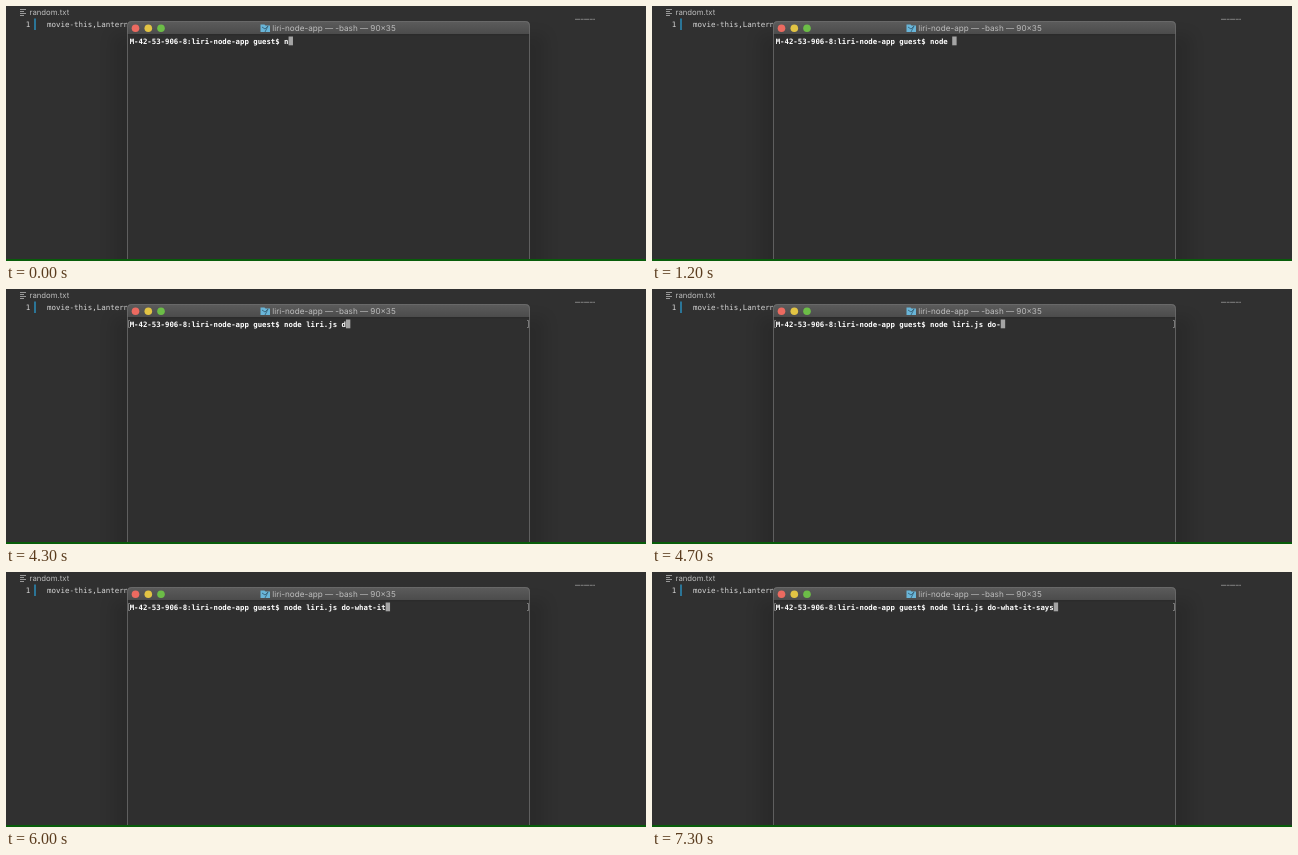
Recreate the animation shown at these times as an HTML page. Size 640 px wide and 255 px high, loop 8 s.

```html
<!DOCTYPE html>
<html lang="en">
<head>
<meta charset="utf-8">
<title>Terminal typing</title>
<style>
  html, body { margin: 0; width: 100%; height: 100%; overflow: hidden; background: #303030; }
  svg { display: block; }
  text { white-space: pre; text-rendering: geometricPrecision; }
  .ui { font-family: Inter, sans-serif; fill: #bcbcbc; }
  .code { font: 7.5px "DejaVu Sans Mono", monospace; fill: #d6d6d6; }
  .shell { font: bold 7.33px "DejaVu Sans Mono", monospace; fill: #fff; }
</style>
</head>
<body>
<svg width="640" height="255" viewBox="0 0 640 255">
  <defs>
    <filter id="soft" x="-20%" y="-20%" width="140%" height="140%"><feGaussianBlur stdDeviation="7"/></filter>
    <linearGradient id="bar" x2="0" y2="1">
      <stop stop-color="#5c5c5c"/><stop offset="1" stop-color="#4b4b4b"/>
    </linearGradient>
  </defs>

  <!-- editor -->
  <rect width="640" height="255" fill="#303030"/>
  <path d="M14 3.5h6M14 5.5h4M14 7.5h6M14 9.5h4" stroke="#a5a5a5" stroke-width=".9"/>
  <text class="ui" x="23.5" y="9" font-size="7.75">random.txt</text>
  <text class="code" x="19.8" y="20.5">1</text>
  <rect x="28" y="12.5" width="2" height="11.5" fill="#2b7597"/>
  <text class="code" x="41" y="20.5">movie-this,Lantern of the Fern</text>
  <path d="M569 13.3H589" stroke="#808080" stroke-dasharray="5 .6 3 .5"/>

  <!-- terminal window -->
  <rect x="106" y="28" width="434" height="240" fill="#000" opacity=".11" filter="url(#soft)"/>
  <path d="M121 256V19.5q0-4.5 4.5-4.5h394q4.5 0 4.5 4.5V256z" fill="#2f2f2f"/>
  <path d="M121 28.5V19.5q0-4.5 4.5-4.5h394q4.5 0 4.5 4.5v9z" fill="url(#bar)"/>
  <path d="M121 28.7H524" stroke="#202020" stroke-width=".7"/>
  <path d="M121.5 256V19.5q0-4 4-4h394q4 0 4 4V256" fill="none" stroke="#6c6c6c" stroke-width=".8"/>
  <circle cx="129.5" cy="22.2" r="3.8" fill="#ec6a60"/>
  <circle cx="142.3" cy="22.2" r="3.8" fill="#e2c444"/>
  <circle cx="155" cy="22.2" r="3.8" fill="#6cbd47"/>
  <path d="M254.5 18.5h4l1 1h4.5v6.5h-9.5z" fill="#69b5d8"/>
  <path d="M256 21l3 2 3-3-3 6" fill="none" stroke="#37627a" stroke-width=".9"/>
  <text class="ui" x="266.3" y="25.3" font-size="8.12">liri-node-app — -bash — 90×35</text>

  <rect id="cursor" y="30.5" width="4.4" height="8.8" fill="#a4a4a4"/>
  <text id="line" class="shell" x="123.7" y="37.5"></text>
  <path id="marks" d="M124 31.5h-1.5v7h1.5M521 31.5h1.5v7h-1.5" fill="none" stroke="#8c8c8c" stroke-width=".8"/>
  <rect y="253" width="640" height="2" fill="#085c0a"/>
</svg>
<script>
  const LOOP = 8000, LEFT = 123.7, CELL = 4.413, COMPLETED = 2100;
  const PROMPT = "M-42-53-906-8:liri-node-app guest$ ";
  // [time in ms, text that arrives]
  const KEYS = [
    [0, "n"], [100, "o"], [300, "d"], [500, "e"], [1200, " "],
    [1600, "l"], [1700, "i"], [1800, "r"], [COMPLETED, "i.js "],
    [4300, "d"], [4400, "o"], [4700, "-"], [5000, "w"], [5100, "h"],
    [5300, "a"], [5400, "t"], [5600, "-"], [5900, "i"], [6000, "t"],
    [6500, "-"], [6700, "s"], [7000, "a"], [7100, "y"], [7300, "s"]
  ];
  const [line, cursor, marks] = ["line", "cursor", "marks"].map(id => document.getElementById(id));

  function draw(now) {
    const t = now % LOOP;
    const text = PROMPT + KEYS.filter(([at]) => at <= t).map(([, typed]) => typed).join("");
    line.textContent = text;
    cursor.setAttribute("x", LEFT + text.length * CELL);
    marks.setAttribute("visibility", t >= COMPLETED ? "visible" : "hidden");
    requestAnimationFrame(() => draw(performance.now()));
  }
  draw(performance.now());
</script>
</body>
</html>
```
